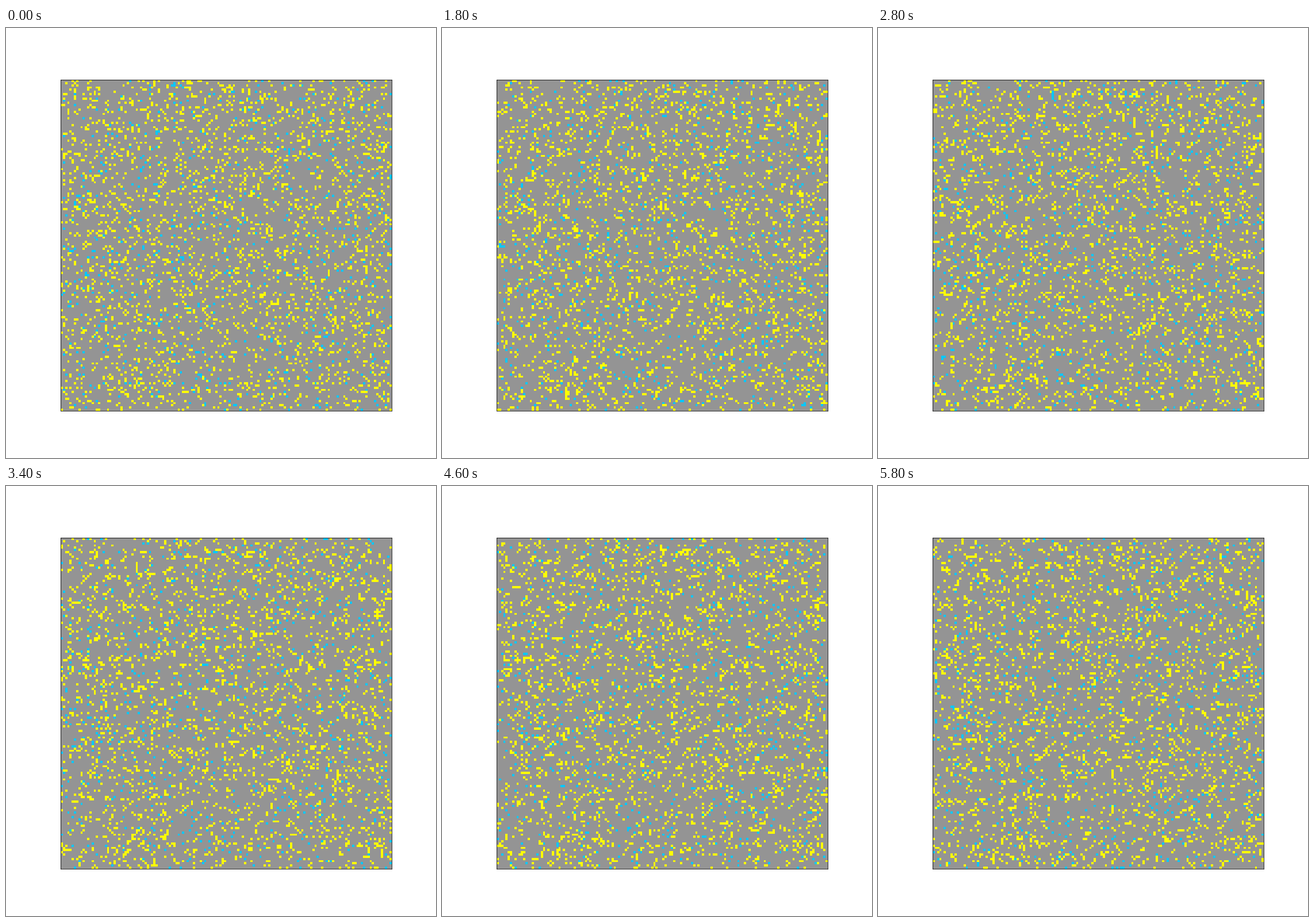
Write a matplotlib script that moves like this. It is 748 px wide and 748 px high and loops after 6000 ms.

```python
import random

import matplotlib.pyplot as plt
import numpy as np
from matplotlib.animation import FuncAnimation
from matplotlib.colors import ListedColormap

SIZE, DPI = 748, 100
N = 150
FRAMES, STEP_MS = 30, 200
EMPTY, SOCIAL, LONER = range(3)
N_SOCIAL, N_LONER = 2650, 640
COLORS = ["#949494", "#ffff00", "#00c8ff"]
SOCIABILITY = 0.5

OFFSETS = [(dr, dc) for dr in (-1, 0, 1) for dc in (-1, 0, 1) if dr or dc]
rng = random.Random(7)


def neighbours(r, c):
    return [((r + dr) % N, (c + dc) % N) for dr, dc in OFFSETS]


def company(grid, cell):
    return sum(grid[n] == SOCIAL for n in neighbours(*cell))


def seed():
    grid = np.zeros((N, N), dtype=int)
    picks = rng.sample(range(N * N), N_SOCIAL + N_LONER)
    grid.flat[picks[:N_SOCIAL]] = SOCIAL
    grid.flat[picks[N_SOCIAL:]] = LONER
    return grid


def advance(grid):
    """Everyone steps to a free neighbour; social ones often pick company."""
    grid = grid.copy()
    walkers = [(int(r), int(c)) for r, c in np.argwhere(grid)]
    rng.shuffle(walkers)
    for cell in walkers:
        kind = grid[cell]
        free = [n for n in neighbours(*cell) if grid[n] == EMPTY]
        if not free:
            continue
        grid[cell] = EMPTY
        spot = rng.choice(free)
        if kind == SOCIAL and rng.random() < SOCIABILITY:
            spot = max(spot, rng.choice(free), key=lambda s: company(grid, s))
        grid[spot] = kind
    return grid


# The opening state is held for two steps.
states = [seed()]
states.append(states[0])
while len(states) < FRAMES:
    states.append(advance(states[-1]))

fig, ax = plt.subplots(figsize=(SIZE / DPI, SIZE / DPI), dpi=DPI,
                       facecolor="white")
fig.subplots_adjust(left=0.125, right=0.9, bottom=0.11, top=0.88)
ax.set(xticks=[], yticks=[])
ax.spines[:].set_linewidth(0.58)
image = ax.imshow(states[0], cmap=ListedColormap(COLORS), vmin=0, vmax=2,
                  interpolation="nearest")


def draw(i):
    image.set_data(states[i % FRAMES])
    return (image,)


anim = FuncAnimation(fig, draw, frames=FRAMES, interval=STEP_MS,
                     repeat=True, repeat_delay=0, blit=False)
plt.show()
```
